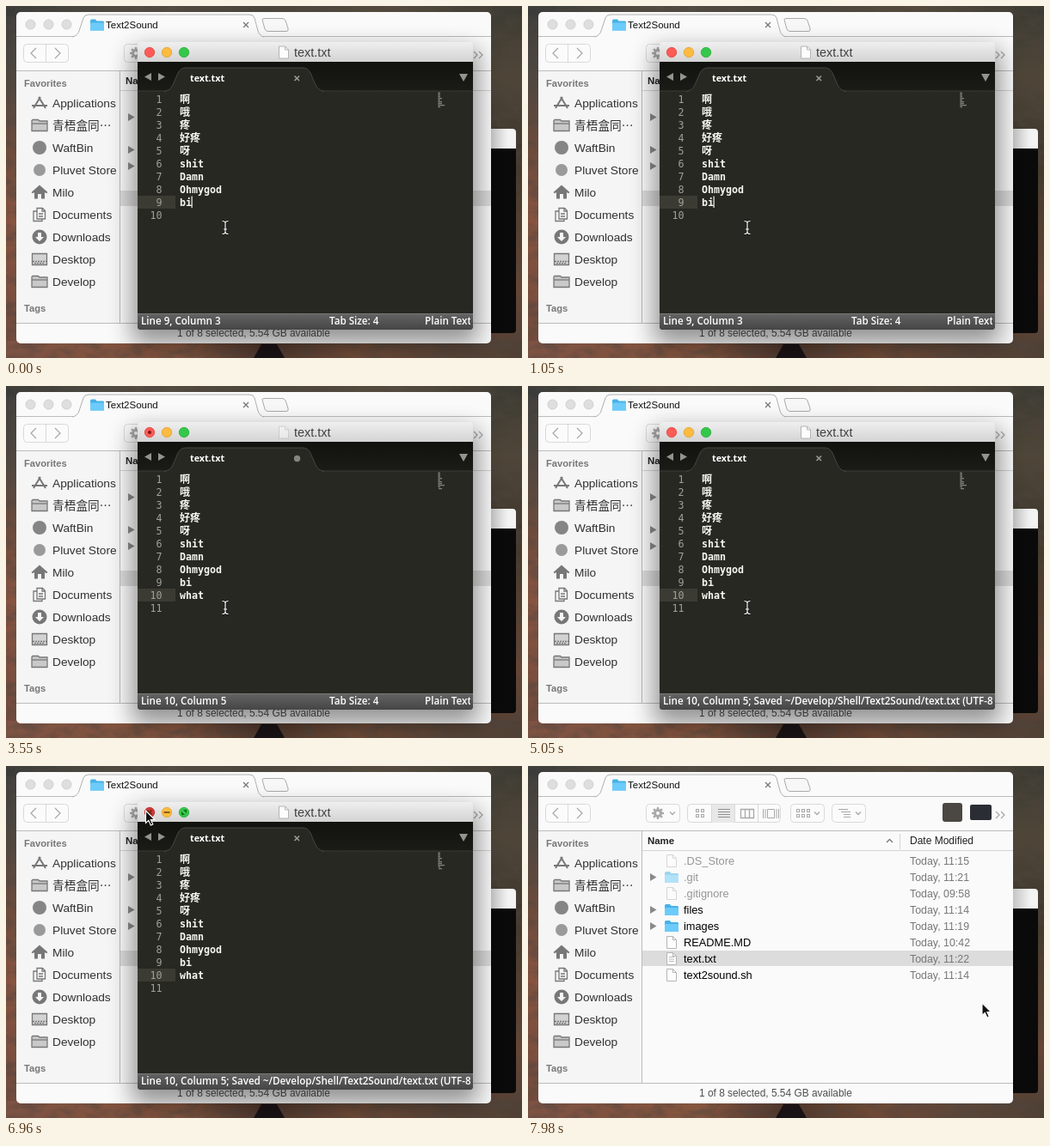
An HTML page for the animation above (8 s loop, 600 by 410 pixels).

```html
<!DOCTYPE html>
<html lang="en">
<head>
<meta charset="utf-8">
<title>Editing a text file</title>
<style>
  html, body { margin: 0; width: 100%; height: 100%; overflow: hidden; }
  svg { display: block; width: 100vw; height: 100vh; }
  text { font-family: "Liberation Sans", "Noto Sans CJK SC", "Noto Sans CJK", sans-serif; white-space: pre; }
  .code { font: 700 11.63px "DejaVu Sans Mono", "Noto Sans CJK SC", "Noto Sans CJK", monospace; fill: #f8f8f2; }
  .cjk { font-size: 12px; }
  .gutter { font-weight: 400; fill: #a0a19a; text-anchor: end; }
  .ui { font: 600 11.63px "Open Sans", sans-serif; fill: #fff; }
  .line { fill: none; stroke: #777; stroke-width: 1.3; }
  .tool .line { stroke: #a9a9a9; }
</style>
</head>
<body>
<svg id="stage" viewBox="0 0 600 410" preserveAspectRatio="none"></svg>
<script>
const LOOP = 8000, STEP = 147.7;
const NEWLINE = 1640, RELAYOUT = 2520, SAVE = 4900, HOVER = 6400, PRESS = 6800, CLOSE = 7100;
const KEY_TIMES = [2230, 2370, 2810, 2960];
const LINES = ['啊', '哦', '疼', '好疼', '呀', 'shit', 'Damn', 'Ohmygod', 'bi'];
const CARET = [[0, 1], [150, 1], [300, 0], [450, 0], [600, 1], [1050, 1], [1200, 0], [1350, 0], [1490, 1],
  [3250, 1], [3550, 0], [3850, 0], [4000, 1], [4599, 1], [4600, 0], [LOOP, 0]];
const TOOL = '#a9a9a9', RULE = '#bcbcbc';

const rect = (x, y, w, h, fill, extra = '') => `<rect x="${x}" y="${y}" width="${w}" height="${h}" fill="${fill}" ${extra}/>`;
const circle = (x, y, r, fill, extra = '') => `<circle cx="${x}" cy="${y}" r="${r}" fill="${fill}" ${extra}/>`;
const path = (d, fill, extra = '') => `<path d="${d}" fill="${fill}" ${extra}/>`;
const stroke = (d, extra = '') => `<path d="${d}" class="line" ${extra}/>`;
const text = (x, y, size, str, fill, extra = '') => `<text x="${x}" y="${y}" font-size="${size}" fill="${fill}" ${extra}>${str}</text>`;
const styled = (x, y, cls, str, extra = '') => `<text x="${x}" y="${y}" class="${cls}" ${extra}>${str}</text>`;
const at = (x, y, body) => `<g transform="translate(${x} ${y})">${body}</g>`;
const gradient = (id, stops, vertical = true) =>
  `<linearGradient id="${id}" x2="${vertical ? 0 : 1}" y2="${vertical ? 1 : 0}">${stops.map((c, i) =>
    `<stop offset="${i / (stops.length - 1)}" stop-color="${c}"/>`).join('')}</linearGradient>`;

const documentIcon = (x, y) => at(x, y,
  path('M.5 .5H7.5L11.5 4.5V14.5H.5Z', '#fdfdfd', 'stroke="#b4b4b4"') + path('M7.5 .5V4.5H11.5', 'none', 'stroke="#b4b4b4"'));
const folderIcon = (x, y) => at(x, y,
  path('M0 2Q0 0 1.5 0H6L7.5 2H14.5Q16 2 16 3.5V13H0Z', '#45b1e8') + rect(0, 4, 16, 9, '#6ccbfa', 'rx="1"'));
const grayFolder = stroke('M-9-5.5V6.5H9V-5H0L-1.5-6.5H-8Z', 'style="fill:#c9c9c9"') + stroke('M-9-2H9');

const defs = `<defs>
  ${gradient('top', ['#383b39', '#544e43', '#4a463c', '#564c3e', '#3a3a32'], false)}
  ${gradient('left', ['#3a3d3b', '#4e4740', '#6b4b3c', '#875440', '#7d4f3f', '#6f4a3c'])}
  ${gradient('right', ['#3a3a31', '#4f4638', '#40382d', '#503e2f', '#664535', '#524034'])}
  ${gradient('bottom', ['#7d5344', '#80523f', '#85563f', '#4c352b', '#6d4936', '#5c4638', '#4f4034'], false)}
  ${gradient('title', ['#efefef', '#d2d2d2'])}
  ${gradient('tabs', ['#11120e', '#1b1c18'])}
  ${gradient('status', ['#646464', '#454545'])}
  ${gradient('hiddenBar', ['#c4c4c4', '#f3f3f3'], false)}
  <filter id="soft" x="-20%" y="-20%" width="140%" height="140%"><feGaussianBlur stdDeviation="14"/></filter>
  <filter id="rock" x="0" y="0" width="100%" height="100%"><feTurbulence type="fractalNoise" baseFrequency=".05 .09" numOctaves="4" seed="7"/>
    <feColorMatrix values="0 0 0 0 .08  0 0 0 0 .06  0 0 0 0 .05  3 0 0 0 -1.2"/></filter>
  <clipPath id="statusClip"><rect x="153" y="358" width="387" height="20"/></clipPath>
</defs>`;

function desktop() {
  return rect(0, 0, 600, 410, '#3a2d26') + rect(0, 0, 14, 410, 'url(#left)') + rect(560, 0, 40, 410, 'url(#right)') +
    rect(0, 0, 600, 12, 'url(#top)') + rect(0, 390, 600, 20, 'url(#bottom)') +
    rect(0, 0, 600, 410, '#000', 'filter="url(#rock)" opacity=".45"') +
    path('M288 410L297 394H315L324 410Z', '#1a1315') +
    rect(500, 143, 93, 238, '#0b0a0a', 'rx="4"') + path('M564 143H589Q593 143 593 147V166H564Z', '#f3f3f3') +
    rect(564, 143, 20, 23, 'url(#hiddenBar)');
}

function toolbar() {
  const button = (x, w) => rect(x + .5, 44.5, w, 21, '#fbfbfb', 'rx="4" stroke="#d9d9d9"');
  const chevron = x => stroke(`M${x - 3} 53.5L${x} 56.5L${x + 3} 53.5`);
  const grid = (x, cols) => [0, 1].map(r => [...Array(cols).keys()].map(c =>
    rect(x + c * 6, 50.5 + r * 6, 3, 3, 'none', `stroke="${TOOL}"`)).join('')).join('');
  const bars = (x, w) => [0, 1, 2, 3].map(i => rect(x, 50 + i * 3, w, 1, '#8f8f8f')).join('');
  const spokes = [0, 45, 90, 135].map(a => `<path d="M-7 0H7" stroke="${TOOL}" stroke-width="2.4" transform="rotate(${a})"/>`).join('');
  return '<g class="tool">' + button(20, 52) + rect(46, 45, 1, 21, '#dadada') + stroke('M35 49L29 55L35 61M57 49L63 55L57 61') +
    button(137, 39) + at(151, 55, spokes + circle(0, 0, 5, TOOL) + circle(0, 0, 2, '#fbfbfb')) + chevron(168) +
    button(185, 108) + rect(213, 45, 27, 21, '#e8e8e8') +
    [213, 240, 267].map(x => rect(x, 45, 1, 21, '#d9d9d9')).join('') +
    grid(195.5, 2) + bars(221, 14) +
    stroke('M247.5 50.5H262.5V60.5H247.5ZM252.5 50.5V60.5M257.5 50.5V60.5') +
    stroke('M278.5 50.5H286.5V60.5H278.5ZM276 50V61M273.5 50V61M289 50V61M291.5 50V61', 'style="stroke-width:1"') +
    button(305, 39) + grid(312.5, 3) + chevron(336) +
    button(353, 39) + rect(361, 50, 11, 1, TOOL) + rect(364, 53, 11, 1, TOOL) + rect(367, 56, 8, 1, TOOL) +
    rect(367, 59, 8, 1, TOOL) + chevron(384) +
    rect(482, 43, 23, 22, '#4b4843', 'rx="3"') + rect(514, 45, 25, 18, '#2b2d34', 'rx="2"') +
    stroke('M544 53L548 57L544 61M550 53L554 57L550 61') + '</g>';
}

function sidebar() {
  const house = path('M-9.5 0L0-8.5L9.5 0L8 1.2L6 0V7.5H2V2H-2V7.5H-6V0L-8 1.2Z', '#777');
  const pages = stroke('M-3-7.5H3.5L6.5-4.5V5H-3ZM3-7V-4H6M-3-4H-7V7.5H3V5M-1-1H4M-1 2H4');
  const items = [
    ['Applications', stroke('M-7 6L1-7M7 6L-1-7M-9 3H9', 'style="stroke-width:2"')],
    ['青梧盒同⋯', grayFolder],
    ['WaftBin', circle(0, 0, 8, '#858585')],
    ['Pluvet Store', circle(0, 0, 7, '#9a9a9a')],
    ['Milo', house],
    ['Documents', pages],
    ['Downloads', circle(0, 0, 8.5, '#777') + path('M-2-5H2V0H5L0 5L-5 0H-2Z', '#f5f5f5')],
    ['Desktop', stroke('M-8.5-6.5H8.5V6.5H-8.5Z', 'style="fill:#d2d2d2"') + stroke('M-8 2.5H8M-6 4.7H6', 'style="stroke-dasharray:2 1"')],
    ['Develop', grayFolder]];
  return rect(12, 76, 120, 294, '#f5f5f5') + rect(132, 76, 1, 294, RULE) +
    text(21, 94, 11.2, 'Favorites', '#777', 'font-weight="700"') + text(21, 356, 11.2, 'Tags', '#777', 'font-weight="700"') +
    items.map(([name, icon], i) => at(39, 113 + 26 * i, icon) + text(54, 118 + 26 * i, 13.7, name, '#303030')).join('');
}

function fileList() {
  const files = [['.DS_Store', '11:15'], ['.git', '11:21', 1], ['.gitignore', '09:58'], ['files', '11:14', 1],
    ['images', '11:19', 1], ['README.MD', '10:42'], ['text.txt', '11:22'], ['text2sound.sh', '11:14']];
  return rect(133, 98, 431, 1, '#d4d4d4') + rect(432, 79, 1, 18, '#d4d4d4') +
    text(139, 91, 11.4, 'Name', '#222', 'font-weight="700"') + text(444, 91, 12, 'Date Modified', '#222') +
    stroke('M417 89L420.5 85.5L424 89') + rect(133, 215, 431, 18, '#dcdcdc') +
    files.map(([name, time, folder], i) => {
      const y = 110.5 + 19 * i;
      return `<g opacity="${i < 3 ? .5 : 1}">` +
        (folder ? folderIcon(159, y - 6.5) : documentIcon(161, y - 7.5)) +
        text(181, y + 4.5, 12.8, name, i < 3 ? '#333' : '#000') + '</g>' +
        (folder ? path(`M142 ${y - 4.5}V${y + 4.5}L149.5 ${y}Z`, '#8a8a8a') : '') +
        text(444, y + 4.5, 12.4, `Today, ${time}`, '#777');
    }).join('') + stroke('M164 222.5H170M164 225H170M164 227.5H170', 'style="stroke:#bbb;stroke-width:1"');
}

function finder() {
  return rect(12, 7, 552, 386, '#fafafa', 'rx="5"') + rect(12, 35, 552, 1, RULE) +
    [28, 49, 70].map(x => circle(x + .5, 21.5, 5.5, '#dedede', 'stroke="#d0d0d0"')).join('') +
    path('M77 36Q83 35 85 29L90 14Q91 10 96 10H283Q288 10 289 14L293 29Q295 35 300 36', '#fafafa', 'stroke="#b0b0b0"') +
    folderIcon(98, 15.5) + text(116, 26, 11.5, 'Text2Sound', '#111') + stroke('M276 19L282 25M282 19L276 25') +
    path('M298 16Q298 14.5 300 14.5H321Q324 14.5 325 17L328 26Q329 29.5 326 29.5H305Q302 29.5 301 27Z', '#f7f7f7', 'stroke="#aaa"') +
    toolbar() + rect(12, 75, 552, 1, RULE) + sidebar() + fileList() +
    rect(12, 369, 552, 1, RULE) + text(199, 385, 11.9, '1 of 8 selected, 5.54 GB available', '#505050');
}

function editor() {
  const buttons = [['#fc5b57', '#dd4440'], ['#fdbb3f', '#dfa032'], ['#34c84a', '#27aa35']]
    .map(([fill, edge], i) => circle(167 + 20 * i, 54, 5.7, fill, `stroke="${edge}" stroke-width=".8"`)).join('');
  const codeLine = (str, i) => styled(202, 112.5 + 15 * i, i < 5 ? 'code cjk' : 'code', str);
  const mapLine = (str, i) => rect(503, 101 + 2 * i, i < 5 ? str.length * 2 : str.length, 1.2, '#85867f');
  return rect(147, 51, 402, 342, '#000', 'filter="url(#soft)" opacity=".42"') +
    path('M153 66V46Q153 42 157 42H539Q543 42 543 46V66Z', 'url(#title)') +
    path('M153 65H543V373Q543 377 539 377H157Q153 377 153 373Z', '#272822') +
    buttons + circle(167, 54, 2, '#7a1512', 'id="dirtyDot"') +
    circle(167, 54, 6, '#a51f1f', 'id="pressed" opacity=".55"') +
    `<g id="hover" stroke="#3a2008" stroke-width="1.4" opacity=".8">${path('M164.5 51.5L169.5 56.5M169.5 51.5L164.5 56.5M183.5 54H190.5', 'none')}
      ${path('M204 53V57H208ZM206 51H210V55Z', '#0b5511', 'stroke="none"')}</g>` +
    `<g id="proxy">${documentIcon(317, 46.5)}</g>` + text(335, 59, 14.4, 'text.txt', '#404040') +
    rect(153, 65, 390, 34, 'url(#tabs)') + rect(153, 98.5, 390, 1, '#3c3d37') +
    path('M184 100Q191 99 194 92L200 78Q203 72 209 72H345Q351 72 354 78L360 92Q363 99 370 100Z', '#272822') +
    path('M184 99.5Q191 98.5 194 92L200 78Q203 72 209 72H345Q351 72 354 78L360 92Q363 98.5 370 99.5', 'none', 'stroke="#454640"') +
    path('M169 78V87L161 82.5ZM177 78V87L185 82.5ZM527 79H537L532 88Z', '#94948f') +
    styled(214, 88, 'ui', 'text.txt', 'style="font-size:10.7px;font-weight:700"') +
    stroke('M335.5 81.5L341 87M341 81.5L335.5 87', 'id="tabClose" style="stroke:#999;stroke-width:1.6"') +
    circle(338.5, 84.5, 3.7, '#858580', 'id="tabDot"') +
    rect(153, 221, 44, 15, '#3b3b33', 'id="activeLine"') +
    [...Array(11).keys()].map(i => styled(181.5, 112.5 + 15 * i, 'code gutter', i + 1, `id="num${i + 1}"`)).join('') +
    LINES.map(codeLine).join('') + styled(202, 247.5, 'code', '', 'id="typed"') +
    LINES.map(mapLine).join('') + rect(503, 119, 0, 1.2, '#85867f', 'id="typedMap"') +
    rect(502.5, 100, 1, 18, '#777871') +
    rect(0, 0, 1.2, 13.5, '#f8f8f0', 'id="caret"') +
    path('M153 358H543V373Q543 377 539 377H157Q153 377 153 373Z', 'url(#status)') + rect(153, 358, 390, 1, '#777') +
    `<g clip-path="url(#statusClip)">${styled(157, 371, 'ui', '', 'id="position"')}
      <g id="settings">${styled(376, 371, 'ui', 'Tab Size: 4')}${styled(487, 371, 'ui', 'Plain Text')}</g></g>`;
}

const ibeam = 'M-3.5-7.5Q0-7.5 0-5V5Q0 7.5-3.5 7.5M3.5-7.5Q0-7.5 0-5V5Q0 7.5 3.5 7.5M-2 2H2';
const arrow = 'M0 0V14.5L3.3 11.4L5.8 17L8.3 15.9L5.8 10.5H10.4Z';

document.getElementById('stage').innerHTML = defs + desktop() + finder() + `<g id="editor">${editor()}</g>` +
  `<g id="ibeam">${path(ibeam, 'none', 'stroke="#111" stroke-width="2.6"')}${path(ibeam, 'none', 'stroke="#fff" stroke-width="1.2"')}</g>` +
  path(arrow, '#111', 'id="arrow" stroke="#fff" stroke-width="1.1"');

const $ = id => document.getElementById(id);
const set = (id, attrs) => Object.entries(attrs).forEach(([name, value]) => $(id).setAttribute(name, value));
const show = (id, on) => set(id, { visibility: on ? 'inherit' : 'hidden' });

function track(keys, t) {
  const i = keys.findIndex(([time]) => time > t);
  const [[t0, a], [t1, b]] = [keys[i - 1], keys[i]];
  return a + (b - a) * (t - t0) / (t1 - t0);
}

function pointer(t) {
  const time = Math.floor((t + 5) / STEP) * STEP;
  const glide = (from, to, start, end) => {
    const u = Math.min(1, Math.max(0, (time - start) / (end - start)));
    const eased = u * u * (3 - 2 * u);
    return from.map((v, k) => v + (to[k] - v) * eased);
  };
  return t < CLOSE ? glide([255, 258], [162.5, 52], 5150, 6700) : glide([162.5, 52], [528, 276], CLOSE, 7970);
}

function render(t) {
  const onNewLine = t >= NEWLINE, saved = t >= SAVE, dirty = onNewLine && !saved;
  const count = KEY_TIMES.filter(time => t >= time).length;
  const column = onNewLine ? count : 2;

  set('editor', { visibility: t < CLOSE ? 'visible' : 'hidden' });
  show('dirtyDot', dirty);
  show('tabDot', dirty);
  show('tabClose', !dirty);
  set('proxy', { opacity: dirty ? .45 : 1 });
  show('hover', t >= HOVER);
  show('pressed', t >= PRESS);
  show('num11', onNewLine);
  set('activeLine', { y: onNewLine ? 236 : 221 });
  $('typed').textContent = 'what'.slice(0, count);
  set('typedMap', { width: count });
  set('caret', { x: 201.5 + 7 * column, y: onNewLine ? 236.5 : 221.5, opacity: track(CARET, t) });

  $('position').textContent = `Line ${onNewLine ? 10 : 9}, Column ${column + 1}` +
    (saved ? '; Saved ~/Develop/Shell/Text2Sound/text.txt (UTF-8)' : '');
  show('settings', !saved);
  set('settings', { transform: `translate(${onNewLine && t < RELAYOUT ? 7 : 0} 0)` });

  const [x, y] = pointer(t), overText = t < CLOSE && y > 100;
  ['ibeam', 'arrow'].forEach(id => set(id, { transform: `translate(${x} ${y})` }));
  show('ibeam', overText);
  show('arrow', !overText);
}

const start = performance.now();
function tick() {
  render((performance.now() - start) % LOOP);
  requestAnimationFrame(tick);
}
tick();
</script>
</body>
</html>
```
